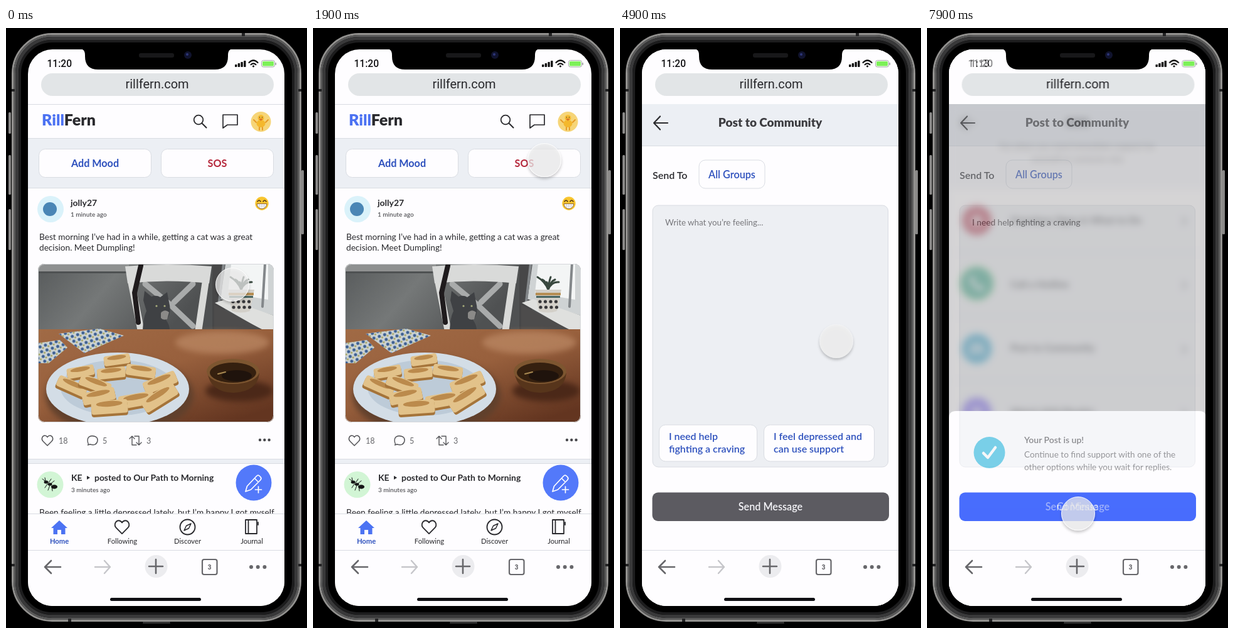
These frames come from a looping animation (480x954 px, 8000 ms). An HTML page:

```html
<!DOCTYPE html>
<html lang="en">
<head>
<meta charset="utf-8">
<title>Support feed</title>
<style>
html, body { margin: 0; width: 100%; height: 100%; overflow: hidden; background: #000; }
svg { display: block; width: 100vw; height: 100vh; }
text { font-family: Lato, sans-serif; white-space: pre; }
.ui { font-family: Roboto, sans-serif; }
.blur { filter: blur(6px); }
.soft { filter: blur(5px); }
.line { fill: none; stroke: #29292d; stroke-width: 2; stroke-linecap: round; stroke-linejoin: round; }
</style>
</head>
<body>
<svg id="stage" viewBox="0 0 480 954"></svg>
<script>
const INK = '#29292d', BLUE = '#2d50bd', PALE = '#eceff4', EDGE = '#d9dce2', WHITE = '#fefdff';

const rect = (x, y, w, h, fill, r = 0, extra = '') =>
  `<rect x="${x}" y="${y}" width="${w}" height="${h}" rx="${r}" fill="${fill}" ${extra}/>`;
const circle = (x, y, r, fill, extra = '') => `<circle cx="${x}" cy="${y}" r="${r}" fill="${fill}" ${extra}/>`;
const ellipse = (x, y, rx, ry, fill, extra = '') => `<ellipse cx="${x}" cy="${y}" rx="${rx}" ry="${ry}" fill="${fill}" ${extra}/>`;
const shape = (d, fill, extra = '') => `<path d="${d}" fill="${fill}" ${extra}/>`;
const line = (d, color = INK, width = 2) => `<path class="line" d="${d}" style="stroke:${color};stroke-width:${width}"/>`;
const text = (x, y, size, str, { w = 400, fill = INK, mid = false, ui = false } = {}) =>
  `<text x="${x}" y="${y}" font-size="${size}" font-weight="${w}" fill="${fill}"` +
  `${mid ? ' text-anchor="middle"' : ''}${ui ? ' class="ui"' : ''}>${str}</text>`;
const move = (x, y, body) => `<g transform="translate(${x} ${y})">${body}</g>`;
const dots = (x, y, gap, r, fill) => [0, 1, 2].map(i => circle(x + i * gap, y, r, fill)).join('');
const box = (x, y, w, h) => rect(x, y, w, h, WHITE, 10, `stroke="${EDGE}"`);
const rule = y => rect(35, y, 410, 1, EDGE);
const heart = 'M0 8.500L-7 1.500C-10.500 -2 -8 -7.500 -4 -7.500C-2 -7.500 -.8 -6.300 0 -5C.8 -6.300 2 -7.500 4 -7.500C8 -7.500 10.500 -2 7 1.500Z';

function device() {
  const ring = (inset, fill, stroke, width) =>
    rect(9.5 + inset, 8.5 + inset, 461 - 2 * inset, 935 - 2 * inset, fill, 64 - inset, `stroke="${stroke}" stroke-width="${width}"`);
  const keys = [[4, 134, 34], [4, 202, 63], [4, 288, 65], [471, 226, 102]]
    .map(([x, y, h]) => rect(x, y, 4, h, '#8a8988', 1.5)).join('');
  const bands = [[9, 97, 5, 4], [9, 852, 5, 4], [466, 97, 5, 4], [466, 852, 5, 4], [376, 8, 5, 5], [99, 939, 5, 5]]
    .map(([x, y, w, h]) => rect(x, y, w, h, '#232324')).join('');
  return rect(0, 0, 480, 954, '#000') + keys + rect(218, 944, 44, 3, '#333', 1) +
    ring(1, '#000', '#92918f', 3) + ring(4, 'none', '#5b5b5b', 3) +
    ring(8, 'none', '#39393a', 5) + ring(12.5, 'none', '#1d1d1e', 4) + bands;
}

function notch() {
  return shape('M117 33Q126 33 126 43V45Q126 66 147 66H333Q354 66 354 45V43Q354 33 363 33Z', '#000') +
    rect(212, 40, 56, 7, '#18181a', 3) + circle(290, 43, 6, '#10132e') + circle(289, 42, 2, '#2d3678');
}

function statusBar(time, timeX, dx) {
  const bars = [4, 6, 8, 10].map((h, i) => rect(365 + i * 4.7, 62 - h, 3.4, h, '#111', .8)).join('');
  const wifi = line('M387.500 55Q394.500 48 401.500 55', '#111', 2.2) + line('M390.500 58.200Q394.500 54.500 398.500 58.200', '#111', 2) + circle(394.5, 60.8, 1.6, '#111');
  const battery = rect(407.5, 51.5, 21, 10.5, WHITE, 3, 'stroke="#a5a5a5"') + rect(409, 53, 18, 7.5, '#7df158', 1.5) + rect(429.5, 55, 1.5, 4, '#999', 1);
  return text(timeX, 62, 15.6, time, { w: 500, fill: '#141416', ui: true }) + move(dx, 0, bars + wifi + battery +
    rect(56, 72, 371, 36, '#e2e5e7', 18) + text(241, 96, 20, 'rillfern.com', { mid: true, ui: true }));
}

function toolbar() {
  return rect(35, 830, 410, 90, WHITE) + rule(830) +
    line('M87 857H62M72 847L62 857L72 867', '#67676b', 2.6) + line('M142 857H166M157 847L166 857L157 867', '#c6c6ca', 2.4) +
    circle(239.5, 856, 18, '#ececef') + line('M228 856H250M239 845V867', '#67676b', 2.6) +
    rect(313, 845, 23.5, 24, 'none', 3, 'stroke="#67676b" stroke-width="2.200"') +
    text(324.7, 860.5, 10, '3', { w: 700, fill: '#5c5c60', mid: true, ui: true }) +
    dots(391, 857, 10.7, 3, '#67676b') + rect(166, 906, 145, 5, '#101014', 2.5);
}

function photo() {
  const slices = [[177, 528, -8], [119, 547, -10], [168, 549, -6], [215, 546, 8], [105, 570, 24], [142, 567, 20], [148, 586, -12],
    [246, 564, -22], [208, 592, -10], [165, 603, -4], [245, 588, -32]];
  const bread = slices.map(([x, y, turn], i) => {
    const w = 42 + i * 1.8, h = 17 + i * .6;
    return `<g transform="translate(${x} ${y}) rotate(${turn})">` + rect(-w / 2, -h / 2 + 3, w, h, '#a5743a', 4) +
      rect(-w / 2, -h / 2, w, h - 1, '#e2c28a', 4) + ellipse(0, -h / 4, w * .36, h * .2, '#bb8a4c') + '</g>';
  }).join('');
  const napkin = d => shape(d, '#ccd3d4') + shape(d, 'url(#print)');
  const leaves = [-17, -9, -3, 4, 11, 17].map((x, i) => line(`M375 416Q${375 + x * .3} 403 ${375 + x} ${396 + i % 3 * 4}`, '#39483f', 3)).join('');
  const chair = line('M222 407L262 440L298 474M298 407L268 436', '#a9abab', 9) +
    line('M200 405L215 480M318 405L307 480', '#d9dad8', 11) + shape('M190 379Q258 373 328 379L324 406Q258 399 194 406Z', '#d9dad9');
  const cat = shape('M218 480Q219 460 224 450L219 433L221 418L232 427Q240 424 246 428L257 420L260 436Q265 455 255 464Q261 472 261 480Z', '#3f4144') +
    shape('M247 453Q253 446 260 452L257 463Q250 465 247 461Z', '#8b8a88') + circle(240, 442, 1.6, '#a8ad7c') + circle(253, 442, 1.6, '#a8ad7c');
  const pot = shape('M354 416H396L389 450Q375 455 360 450Z', '#d3d0c9') + rect(355, 421, 40, 4, '#b58d52') + rect(356, 426, 38, 3, '#47645f') +
    [0, 1].map(row => [0, 1, 2, 3].map(i => circle(362 + i * 8.5 + row, 435 + row * 9, 2.6, '#37373a')).join('')).join('');
  const room = rect(51, 375, 376, 110, 'url(#wall)') + rect(51, 375, 145, 12, '#8f9191') + rect(51, 387, 145, 3, '#4e5152') +
    rect(329, 375, 20, 105, '#474748') + shape('M350 375H427V457L342 431Z', '#cfd3d4') + shape('M359 375H418V432L354 421Z', '#f3f5f5') +
    line('M413 375L409 443M347 375L340 435', '#83878a', 4) + shape('M333 437L351 431L427 457V481H410Z', '#dfe0de') + shape('M332 440L410 480H332Z', '#4d4c4c');
  const table = rect(51, 479, 376, 149, 'url(#table)') + ellipse(345, 500, 75, 18, '#bd8a66', 'class="soft" opacity=".7"') +
    ellipse(181, 584, 118, 62, '#60402c', 'class="soft"') + ellipse(372, 577, 54, 17, '#4b2818', 'class="soft"');
  const plate = ellipse(178, 574, 114, 58, '#d3dde6') + ellipse(178, 572, 91, 44, '#bdcbd8') + bread;
  const bowl = shape('M321 546Q325 579 363 580Q401 578 404 549Z', '#57351b') +
    ellipse(362, 546, 42, 20, '#7d5630') + ellipse(362, 548, 37, 16, '#35200f') + ellipse(368, 553, 24, 9, '#1f130c') + line('M338 550L350 547', '#a98a52', 2);
  const scene = room + chair + line('M215 378L205 421L211 468', '#1f1b1d', 8) + cat + leaves + pot + table +
    napkin('M51 501L86 496L98 508L68 533H51Z') + napkin('M84 486L149 478L188 489L125 517Z') + plate + bowl;
  return `<g clip-path="url(#photoClip)">${scene}</g>` + rect(51.5, 375.5, 375, 251, 'none', 10, 'stroke="#d5d7da"');
}

function chick() {
  return circle(406.5, 149, 16, '#f6d578') + ellipse(406.5, 152, 7, 6, '#f4b82c') + circle(406.5, 143, 5, '#f7bd32') +
    line('M399 150L395 146M414 150L418 146M404 158V162M409 158V162', '#e79b27', 2) + shape('M403 144H410L406.500 148Z', '#dd7623') +
    circle(404.5, 142, .8, '#443322') + circle(408.5, 142, .8, '#443322');
}

function ant() {
  return ellipse(64, 722, 3.5, 2.5, '#151515') + ellipse(70, 725.5, 3.5, 2.2, '#151515') + ellipse(77, 729.5, 5, 3.3, '#151515') +
    line('M66 725L62 731M70 727L67 735M73 728L74 736M68 723L72 717M72 724L77 720M62 720L58 717M63 720L62 715', '#151515', 1);
}

function grin() {
  return circle(408, 279, 10.7, '#f8c52f') + line('M401 276Q403.500 272 406 276M410 276Q412.500 272 415 276', '#543817', 1.5) +
    shape('M400 279.500H416Q415 287 408 287.500Q401 287 400 279.500Z', WHITE, 'stroke="#8e6535" stroke-width="1"') + line('M401 283H415M404.500 280V286M408 280V287M411.500 280V286', '#aaa', .5);
}

function home() {
  const small = { w: 600, fill: '#555559' }, name = { w: 700 }, tab = { mid: true }, count = { fill: '#66666a' };
  const header = text(57, 155, 25, `<tspan fill="#4c72f2">Rill</tspan>Fern`, { w: 900 }) +
    circle(307, 146, 7.3, 'none', `stroke="${INK}" stroke-width="1.800"`) + line('M312.500 151.500L319.500 158.500') +
    line('M346 138H369V154H353L346 159Z', INK, 1.7) + chick() +
    rect(35, 175, 410, 80, PALE) + rule(175) + rule(254) + box(52.5, 192.5, 179, 45) + box(247.5, 192.5, 179, 45) +
    text(142, 221, 16.2, 'Add Mood', { w: 700, fill: BLUE, mid: true }) + text(337, 221, 16.2, 'SOS', { w: 700, fill: '#b6293d', mid: true });
  const first = circle(71, 288, 21, '#daf2fa') + circle(70, 288, 11, '#4a86b5') +
    text(103, 283, 14, 'jolly27', name) + text(103, 300, 10, '1 minute ago', small) + grin() +
    text(53, 337, 13.65, 'Best morning I’ve had in a while, getting a cat was a great') + text(53, 354, 13.65, 'decision. Meet Dumpling!') + photo() +
    move(66, 655.5, line(heart, '#555559', 1.5)) + text(84, 661, 12.5, '18', count) +
    line('M131.500 662Q127 650 137 648.500Q147 649 146 656.500Q144 665 134 662L130.500 663Z', '#555559', 1.4) + text(154, 661, 12.5, '5', count) +
    line('M197 653L201 649L205 653M201 650V663H208M205 649H212V662M208 659L212 663L216 659', '#555559', 1.4) + text(224, 661, 12.5, '3', count) +
    dots(405, 655, 7.3, 2.2, '#49494d');
  const second = rect(35, 685, 410, 8, PALE) + rule(685) + rule(692) + circle(70.5, 726, 21, '#d2f5d5') + ant() +
    text(104, 720, 14, 'KE', name) + shape('M129 712L134 715L129 718Z', INK) + text(141, 720, 13.9, 'posted to Our Path to Morning', name) +
    text(104, 738, 10, '3 minutes ago', small) + text(53, 774.5, 13.65, 'Been feeling a little depressed lately, but I’m happy I got myself') +
    circle(395, 723, 28.5, '#5379fa') +
    line('M382 737L384.500 728.500L399.500 712.500Q402 710 404.500 712.500L406 714Q408 716.500 405.500 719L390.500 734ZM396.500 716L402.500 722M402.500 729V739M397.500 734H407.500', '#fff', 1.7);
  const tabs = rect(35, 772, 410, 58, WHITE) + rule(772) +
    shape('M72 795L85 783L98 795H94.500V805H88V798H82V805H75.500V795Z', '#4c73f3') + move(185, 793, `<g transform="scale(1.300)">${line(heart, INK, 1.4)}</g>`) +
    circle(289.5, 793.5, 12, 'none', `stroke="${INK}" stroke-width="1.900"`) + line('M295 788L291.500 795.500L284 799L287.500 791.500Z', INK, 1.5) +
    line('M382 782H400V804H382ZM386.500 782V804M402 786V790', INK, 1.8) +
    text(85, 820, 11.2, 'Home', { w: 700, fill: BLUE, mid: true }) + text(185.5, 820, 11.2, 'Following', tab) + text(289.5, 820, 11.2, 'Discover', tab) + text(392, 820, 11.2, 'Journal', tab);
  return rule(121) + header + first + second + tabs;
}

const backArrow = line('M76 151H54M64 140.500L54 151L64 161.500', '#2b2b2e', 2.2);
const title = str => text(239.5, 156.5, 19, str, { w: 900, fill: '#3c3c40', mid: true });

function sosList() {
  const people = circle(74, 505.5, 4, '#fff') + circle(84.5, 505.5, 4, '#fff') + shape('M67 517V515Q74 508 81 515V517ZM83 517V513L81 511Q87 509 92 515V517Z', '#fff');
  const rows = [
    ['Overdose Signs &amp; What to Do', 306, '#c13148', '#f4d9de', 23, line('M79.500 299.500V312.500M73 306H86', '#fff', 5)],
    ['Call a Hotline', 406, '#20a17d', '#ccf5bd', 25.5, line('M72 397Q71 413 88 415', '#fff', 4) + line('M71.500 398L73 402M84 412.500L88 414', '#fff', 6)],
    ['Post to Community', 510, '#209dcc', '#cff3fb', 23, people],
    ['Watch SOS Playlist', 611, '#7b61fa', '#dedafb', 23, shape('M75 603.500L89 611L75 618.500Z', '#fff')]
  ];
  return rows.map(([label, y, color, halo, r, icon], i) => rect(35, 255 + i * 102, 410, 102, WHITE) + rule(254 + i * 102) +
    circle(79.5, y, r + 4, halo) + circle(79.5, y, r, color) + icon + text(133, 311 + i * 101.7, 15.7, label, { w: 700 }) +
    line(`M407.500 ${301 + i * 102}L413 ${307 + i * 102}L407.500 ${313 + i * 102}`, '#3f3f43', 1.7)).join('') + rule(662);
}

function sos() {
  const note = { fill: '#4c4c50', mid: true };
  return rect(35, 121, 410, 709, PALE) + backArrow + title('SOS') +
    text(240, 193, 13.5, 'For when you need immediate support for', note) + text(240, 213, 13.5, 'yourself or someone else', note) + sosList();
}

const button = (label, color) => rect(51.5, 738.5, 377.5, 45.5, color, 9) + text(240, 766.5, 16.2, label, { w: 600, fill: '#f4f4f8', mid: true });

function compose(filled) {
  const blue = { w: 600, fill: BLUE };
  const chips = box(62.5, 631, 156, 58) + text(78, 654.5, 16, 'I need help', blue) + text(78, 675, 16, 'fighting a craving', blue) +
    box(229.5, 631, 176, 58) + text(245, 654.5, 16, 'I feel depressed and', blue) + text(245, 675, 16, 'can use support', blue);
  return rect(35, 121, 410, 66, PALE) + rule(187) + backArrow + title('Post to Community') +
    text(52, 240, 16, 'Send To', { w: 600 }) + box(126, 210, 105, 45) + text(178.5, 239, 16.2, 'All Groups', { ...blue, mid: true }) +
    rect(52, 282, 375.5, 416, '#edeff3', 9, `stroke="${EDGE}"`) +
    (filled ? text(72, 314, 13.7, 'I need help fighting a craving', { fill: '#3c3c40' }) : text(72, 314, 13.3, 'Write what you’re feeling...', { fill: '#77777b' }) + chips) +
    button('Send Message', filled ? '#486dfd' : '#5c5b61');
}

function posted() {
  const body = { fill: '#3f3f43' };
  return rect(35, 121, 410, 709, PALE) + `<g clip-path="url(#pageClip)"><g class="blur">${sos()}</g></g>` +
    rect(35, 121, 410, 709, '#000', 0, 'opacity=".32"') + shape('M35 830V620Q35 609 46 609H434Q445 609 445 620V830Z', WHITE) +
    circle(99.5, 675, 25, '#08b1df') + line('M90 676L97 683L109 667', '#fff', 4.5) +
    text(155, 660, 14, 'Your Post is up!', { w: 600 }) + text(155, 683, 13.6, 'Continue to find support with one of the', body) +
    text(155, 703, 13.6, 'other options while you wait for replies.', body) + button('Continue', '#486dfd');
}

const page = (id, body, late) => `<g id="${id}">` + rect(35, 34, 410, 886, WHITE) +
  (late ? statusBar('1:13', 69, -1) : statusBar('11:20', 65.5, 0)) + body + '</g>';

document.getElementById('stage').innerHTML = `<defs>
  <clipPath id="screenClip">${rect(35, 34, 409, 885, '#fff', 39)}</clipPath>
  <clipPath id="photoClip">${rect(51, 375, 376, 252, '#fff', 10)}</clipPath>
  <clipPath id="pageClip">${rect(35, 121, 410, 709, '#fff')}</clipPath>
  <linearGradient id="wall" y2=".25"><stop stop-color="#575a5b"/><stop offset=".35" stop-color="#757878"/><stop offset=".75" stop-color="#4f5152"/></linearGradient>
  <linearGradient id="table" x2=".8" y2="1"><stop stop-color="#a06a45"/><stop offset=".5" stop-color="#98603d"/><stop offset="1" stop-color="#633520"/></linearGradient>
  <pattern id="print" width="9" height="8" patternUnits="userSpaceOnUse" patternTransform="rotate(-18)">${circle(3, 3, 2.5, '#3d6093') + circle(7, 6, 1.6, '#a5a45d')}</pattern>
  <filter id="shadow" x="-30%" y="-30%" width="160%" height="170%"><feDropShadow dx="0" dy="3" stdDeviation="2" flood-opacity=".28"/></filter>
</defs>` + device() + `<g clip-path="url(#screenClip)">` +
  page('home', home()) + page('sos', sos(), true) + page('write', compose(false)) + page('ready', compose(true)) + page('posted', posted(), true) +
  toolbar() + notch() + `<g id="touch" filter="url(#shadow)">${circle(0, 0, 26.5, '#f0f0f0', 'id="tip"')}</g></g>`;

// Dissolves: layer, start, end.
const fades = [['sos', 2000, 2400], ['write', 3900, 4400], ['ready', 6000, 6500], ['posted', 7800, 8000]];
// Touch point: time, x, y.
const path = [[0, 361, 408], [800, 375, 392], [950, 375, 392], [1500, 369, 210], [2600, 369, 210], [3200, 346, 502], [3500, 345, 498],
  [5000, 345, 498], [5800, 178, 659], [6700, 178, 659], [7600, 241, 772], [8000, 241, 772]];
// Pressure: time, amount.
const press = [[0, 1], [200, 1], [500, 0], [1700, 0], [1900, 1], [2100, 0], [3600, 0], [3800, 1], [4000, 0], [5750, 0], [5900, 1], [6100, 0], [7600, 0], [7700, 1], [8000, 1]];

const ease = p => p * p * (3 - 2 * p);
const clamp = p => Math.min(1, Math.max(0, p));
function sample(track, t) {
  const i = Math.max(1, track.findIndex(k => k[0] > t)), a = track[i - 1], b = track[i];
  const p = ease((t - a[0]) / (b[0] - a[0]));
  return a.slice(1).map((v, n) => v + (b[n + 1] - v) * p);
}

const el = id => document.getElementById(id);
const touch = el('touch'), tip = el('tip');

function render(time) {
  const t = Math.floor((time % 8000) / 100) * 100;
  for (const [id, start, end] of fades) {
    const p = clamp((t - start) / (end - start));
    el(id).style.opacity = p;
    el(id).style.display = p ? '' : 'none';
  }
  const [x, y] = sample(path, t), [force] = sample(press, t);
  touch.setAttribute('transform', `translate(${x} ${y})`);
  tip.setAttribute('fill-opacity', .84 - force * .14);
  tip.setAttribute('stroke', `rgba(255,255,255,${.3 + force * .6})`);
}

const begin = performance.now();
function tick(now) {
  render(Math.max(0, now - begin));
  requestAnimationFrame(tick);
}
render(0);
requestAnimationFrame(tick);
</script>
</body>
</html>
```
